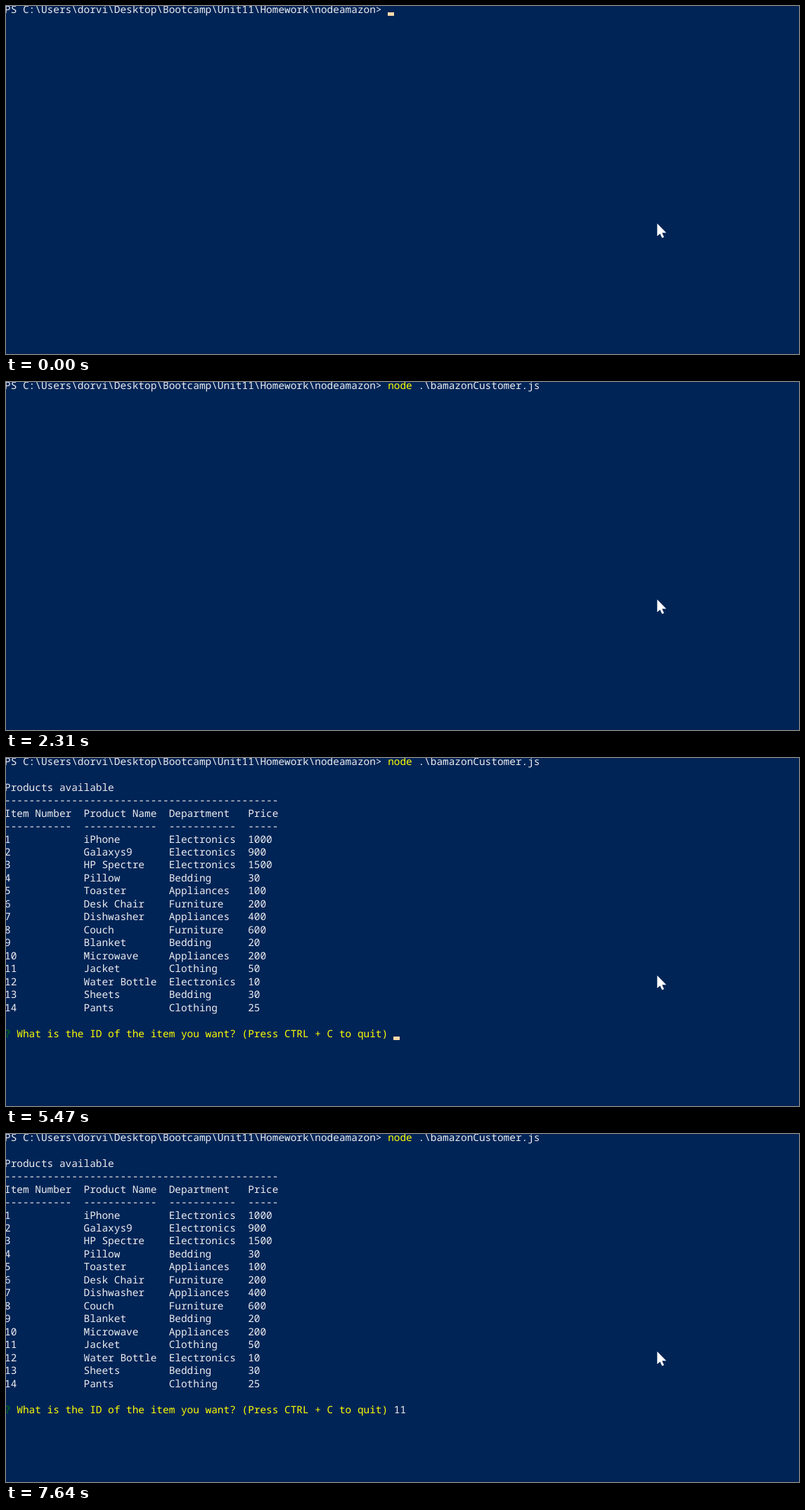
Animation of 1128 by 496 pixels, one loop 8 s. Source, as an HTML page:

```html
<!DOCTYPE html>
<html lang="en">
<head>
<meta charset="utf-8">
<title>Terminal session</title>
<style>
  html, body { margin: 0; width: 100%; height: 100%; overflow: hidden; background: #012456; }
  body { position: relative; }
  pre, #cursor, svg { position: absolute; }
  pre {
    left: -2px; top: -3.4px; margin: 0;
    font: 14.43px/18.48px "Noto Sans Mono", "DejaVu Sans Mono", monospace;
    text-rendering: geometricPrecision;
    font-variant-ligatures: none;
    color: #eeedf0;
  }
  .yellow { color: #ff0; }
  .green { color: #008000; }
  #cursor { width: 9px; height: 5.4px; background: #fedba9; }
  svg { left: 924px; top: 308px; }
</style>
</head>
<body>
<pre>PS C:\Users\dorvi\Desktop\Bootcamp\Unit11\Homework\nodeamazon&gt; <span id="program" class="yellow"></span><span id="argument"></span>
<span id="output"><span id="table"></span>
<span class="green">?</span><span class="yellow"> What is the ID of the item you want? (Press CTRL + C to quit) </span><span id="answer"></span></span></pre>
<div id="cursor"></div>
<svg width="18" height="26">
  <path d="M2.3 2V20L6.3 16.4L9.2 22.6L12 21.4L9.2 15.2H15.2Z" fill="#fff"/>
</svg>
<script>
const LOOP = 8000, CELL = 8.65, LINE = 18.48;
const byId = id => document.getElementById(id);
const [program, argument, output, table, answer, cursor] =
  ['program', 'argument', 'output', 'table', 'answer', 'cursor'].map(byId);

const widths = [11, 12, 11, 5];
const row = cells => cells.map((cell, i) => cell.padEnd(widths[i])).join('  ');
const products = `iPhone,Electronics,1000
Galaxys9,Electronics,900
HP Spectre,Electronics,1500
Pillow,Bedding,30
Toaster,Appliances,100
Desk Chair,Furniture,200
Dishwasher,Appliances,400
Couch,Furniture,600
Blanket,Bedding,20
Microwave,Appliances,200
Jacket,Clothing,50
Water Bottle,Electronics,10
Sheets,Bedding,30
Pants,Clothing,25`.split('\n');

table.textContent = [
  '',
  'Products available',
  '-'.repeat(45),
  row(['Item Number', 'Product Name', 'Department', 'Price']),
  row(widths.map(w => '-'.repeat(w))),
  ...products.map((line, i) => row([String(i + 1), ...line.split(',')])),
  ''
].join('\n');

// Each entry: start time and the properties that change then.
const script = 'node .\\bamazonCustomer.js';
const steps = [
  [0, { command: '', answer: '', output: false, line: 0, col: 63, on: true }],
  [260, { command: 'n', col: 64 }],
  [367, { command: 'no', col: 65 }],
  [473, { command: 'nod', col: 66 }],
  [580, { command: 'node', col: 67 }],
  [770, { on: false }],
  [1260, { command: 'node ', col: 68, on: true }],
  [1460, { command: 'node b', col: 69 }],
  [1860, { command: 'node ba', col: 70 }],
  [1920, { command: script, col: 88 }],
  [2310, { on: false }],
  [2700, { line: 1, col: 0, on: true }],
  [2900, { on: false }],
  [3360, { on: true }],
  [3560, { output: true, line: 21, col: 64 }],
  [3950, { on: false }],
  [4430, { on: true }],
  [4990, { on: false }],
  [5470, { on: true }],
  [6030, { on: false }],
  [6600, { on: true }],
  [7060, { on: false }],
  [7340, { answer: '1', col: 65, on: true }],
  [7540, { answer: '11', col: 66 }],
  [7640, { on: false }]
];

function render() {
  const time = performance.now() % LOOP;
  const state = Object.assign({}, ...steps.filter(([start]) => start <= time).map(([, change]) => change));
  program.textContent = state.command.slice(0, 4);
  argument.textContent = state.command.slice(4);
  answer.textContent = state.answer;
  output.style.visibility = state.output ? 'visible' : 'hidden';
  cursor.style.visibility = state.on ? 'visible' : 'hidden';
  cursor.style.left = -2.3 + state.col * CELL + 'px';
  cursor.style.top = 8.9 + state.line * LINE + 'px';
  requestAnimationFrame(render);
}
render();
</script>
</body>
</html>
```
